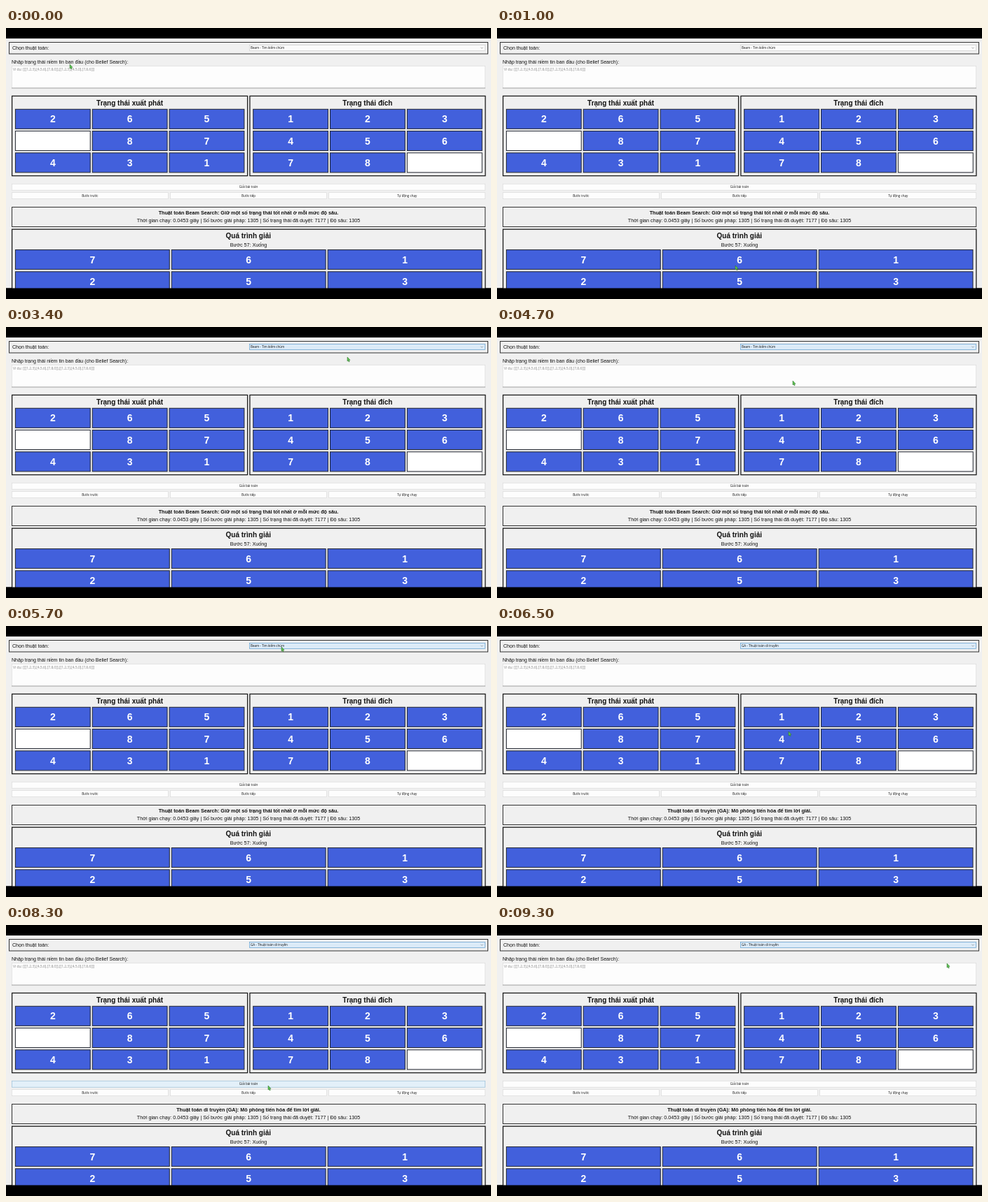
These frames come from a looping animation (692x388 px, 9.4 s). An HTML page:

```html
<!DOCTYPE html>
<html lang="vi">
<head>
<meta charset="utf-8">
<title>8-puzzle</title>
<style>
  html, body { margin: 0; width: 100%; height: 100%; overflow: hidden; background: #000; }
  svg { display: block; width: 692px; height: 388px; }
  text { font-family: "Liberation Sans", Arial, sans-serif; font-size: 7.2px; fill: #111; }
  .label { font-size: 7.05px; }
  .mid { text-anchor: middle; }
  .bold { font-weight: bold; }
  .title { font-size: 10px; font-weight: bold; }
  .digit { font-size: 14px; font-weight: bold; fill: #fff; }
  .ui { font-family: "Open Sans", "Noto Sans", sans-serif; font-size: 4.5px; fill: #111; }
  .hint { font-size: 5px; fill: #888; }
  .panel { fill: #f0f0f0; stroke: #1c1c1c; stroke-width: 1.3; }
  .thin { stroke: #333; stroke-width: 1; }
  .tile { fill: #4260dc; stroke: #20242e; stroke-width: 1; }
  .blank { fill: #fff; }
  .button { fill: #fdfdfd; stroke: #d8d8d8; stroke-width: .6; }
  .button.hover { fill: #e3f0f9; stroke: #8db8d4; }
  .combo { fill: #fbfbfb; stroke: #cfcfcf; stroke-width: .7; }
  .combo.focus { fill: #dcebf8; stroke: #5f9fd0; }
  .line { fill: none; stroke: #777; stroke-width: .6; }
</style>
</head>
<body>
<svg viewBox="0 0 692 388">
  <rect width="692" height="388"/>
  <rect y="15" width="692" height="357.5" fill="#f0f0f0"/>
  <g id="ui"></g>
  <rect y="372.5" width="692" height="15.5"/>
  <path id="cursor" d="M0 0V6L1.3 5L2.2 6.9L3.2 6.4L2.4 4.6L4 4.3Z"
    fill="#5cc450" stroke="#2c6a2a" stroke-width=".5" stroke-linejoin="round"/>
</svg>
<script>
const LOOP = 9400, STEP = 100;
const ui = document.getElementById('ui');
const cursor = document.getElementById('cursor');

function add(tag, attrs, content = '') {
  const el = document.createElementNS('http://www.w3.org/2000/svg', tag);
  for (const name in attrs) el.setAttribute(name, attrs[name]);
  el.textContent = content;
  return ui.appendChild(el);
}
const box = (cls, x, y, width, height) => add('rect', { class: cls, x, y, width, height });
const text = (cls, x, y, content) => add('text', { class: cls, x, y }, content);
const line = d => add('path', { class: 'line', d });

function button(x, y, width, caption) {
  const el = box('button', x, y, width, 9);
  text('ui mid', x + width / 2, y + 6, caption);
  return el;
}

// Three columns fill the width; a 0 is the empty cell.
function board(cells, x, y, width) {
  const pitch = (width + 3) / 3, cell = pitch - 3;
  [...cells].forEach((n, i) => {
    const left = x + (i % 3) * pitch;
    const top = y + Math.floor(i / 3) * 31.25;
    box(n > 0 ? 'tile' : 'tile blank', left, top, cell, 28);
    if (n > 0) text('digit mid', left + cell / 2, top + 19, n);
  });
}

function boardPanel(x, title, cells) {
  box('panel', x, 97.4, 336, 114.2);
  text('title mid', x + 168, 110.7, title);
  board(cells, x + 4.8, 116.3, 326.5);
}

box('panel thin', 4.5, 20.5, 683, 16.5);
text('label', 9, 31.2, 'Chọn thuật toán:');
const combo = box('combo', 347.5, 24.5, 336, 8);
const choice = text('ui', 349, 30, '');
line('M677.3 27.6L679 29.3L680.7 27.6');

text('label', 8, 50.6, 'Nhập trạng thái niềm tin ban đầu (cho Belief Search):');
box('button', 8.3, 54.3, 675.4, 31.7);
line('M8 86H684');
text('ui hint', 10, 61, 'Ví dụ: [[[1,2,3],[4,5,6],[7,8,0]],[[1,2,3],[4,5,0],[7,8,6]]]');

boardPanel(8.6, 'Trạng thái xuất phát', '265087431');
boardPanel(347.9, 'Trạng thái đích', '123456780');

const solve = button(8.3, 223.2, 675.4, 'Giải bài toán');
['Bước trước', 'Bước tiếp', 'Tự động chạy'].forEach((caption, i) =>
  button(8.3 + i * 226.2, 235.7, 223, caption));

box('panel thin', 8.5, 256.5, 675.2, 28);
const about = text('bold mid', 346, 267.2, '');
text('mid', 346, 278.1,
  'Thời gian chạy: 0.0453 giây | Số bước giải pháp: 1305 | Số trạng thái đã duyệt: 7177 | Độ sâu: 1305');

box('panel', 8.6, 288.2, 675.2, 110);
text('title mid', 345.8, 301, 'Quá trình giải');
text('mid', 346, 313.1, 'Bước 57: Xuống');
board('761253', 13.4, 317.6, 665.6);

// Pointer stops: time, x, y; it eases from one to the next.
const stops = [
  [0, 91, 52], [200, 67, 30], [600, 560, 150], [1000, 340, 340], [1400, 174, 150],
  [2000, 545, 143], [2600, 510, 27], [3400, 487, 43], [4700, 422, 77], [5700, 393, 30],
  [6500, 416, 151], [7000, 402, 254], [8000, 374, 230], [8500, 374, 230], [9300, 642, 55]
];
const ease = k => k * k * (3 - 2 * k);

function pointerAt(t) {
  const i = stops.findIndex(stop => stop[0] > t);
  if (i < 0) return stops.at(-1).slice(1);
  const [t0, x0, y0] = stops[i - 1], [t1, x1, y1] = stops[i];
  const k = ease((t - t0) / (t1 - t0));
  return [x0 + (x1 - x0) * k, y0 + (y1 - y0) * k];
}

function draw(now) {
  const t = Math.floor((now % LOOP) / STEP) * STEP;
  const genetic = t >= 6000;
  cursor.setAttribute('transform', `translate(${pointerAt(t)})`);
  combo.classList.toggle('focus', t >= 2500);
  solve.classList.toggle('hover', t >= 7700 && t < 8600);
  choice.textContent = genetic ? 'GA - Thuật toán di truyền' : 'Beam - Tìm kiếm chùm';
  about.textContent = genetic
    ? 'Thuật toán di truyền (GA): Mô phỏng tiến hóa để tìm lời giải.'
    : 'Thuật toán Beam Search: Giữ một số trạng thái tốt nhất ở mỗi mức độ sâu.';
}

const start = performance.now();
function tick() {
  draw(performance.now() - start);
  requestAnimationFrame(tick);
}
tick();
</script>
</body>
</html>
```
